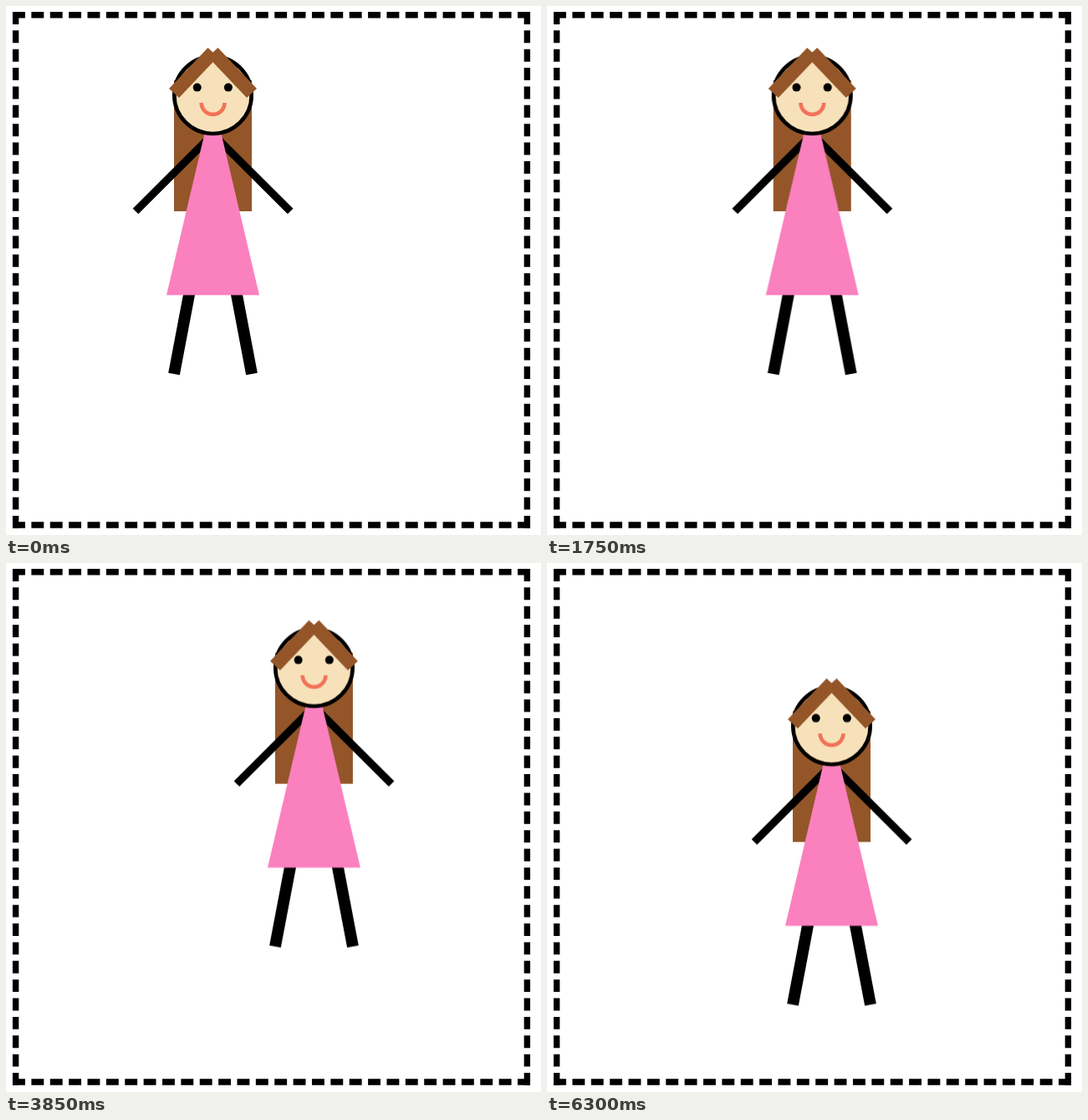
Animation of 640x634 px, one loop 6370 ms. Source, as an HTML page:

```html
<!DOCTYPE html>
<html lang="en">
<head>
<meta charset="utf-8">
<title>Walking stick figure</title>
<style>
  html, body { margin: 0; width: 100%; height: 100%; overflow: hidden; background: #fff; }
  svg { display: block; width: 640px; height: 634px; }

  /* The figure moves in key-press steps of one fixed length. */
  .walk { --s: 4.65px; animation: 6370ms infinite; }
  .across { animation-name: across; }
  .down { animation-name: down; }

  @keyframes across {
    0%    { transform: translateX(0px); }
    6.8%  { transform: translateX(0px); animation-timing-function: steps(4); }
    12%   { transform: translateX(calc(4 * var(--s))); animation-timing-function: steps(10); }
    25.2% { transform: translateX(calc(14 * var(--s))); animation-timing-function: steps(1); }
    27.4% { transform: translateX(calc(15 * var(--s))); animation-timing-function: steps(7); }
    37.3% { transform: translateX(calc(22 * var(--s))); animation-timing-function: steps(3); }
    42.8% { transform: translateX(calc(25 * var(--s))); animation-timing-function: steps(1); }
    45%   { transform: translateX(calc(26 * var(--s))); }
    90.1% { transform: translateX(calc(26 * var(--s))); animation-timing-function: steps(6); }
    98.8%, 100% { transform: translateX(calc(20 * var(--s))); }
  }
  @keyframes down {
    0%    { transform: translateY(0px); }
    54.6% { transform: translateY(0px); animation-timing-function: steps(8); }
    65.9% { transform: translateY(calc(8 * var(--s))); animation-timing-function: steps(3); }
    70.3% { transform: translateY(calc(11 * var(--s))); animation-timing-function: steps(8); }
    82.1%, 100% { transform: translateY(calc(19 * var(--s))); }
  }

  .fence { fill: none; stroke: #000; stroke-width: 7.4; stroke-dasharray: 14.9 7.473; }
  .hair { fill: #945628; }
  .limb { stroke: #000; }
</style>
</head>
<body>
<svg viewBox="0 0 640 634">
  <path class="fence" d="M8 10.7H627M8 622H627M11.6 7V626M623.4 7V626"/>
  <g class="walk across">
    <g class="walk down">
      <rect class="hair" x="201" y="89" width="93" height="157"/>
      <path class="limb" stroke-width="9.3" d="M245 156L155 246M250 156L340.2 246"/>
      <path class="limb" stroke-width="13.9" d="M220.9 336L201 441M274.1 336L294 441"/>
      <path fill="#fb80be" d="M238.2 150H256.8L303 346.5H192Z"/>
      <circle cx="247.5" cy="106.8" r="46.2" fill="#f7e1ba" stroke="#000" stroke-width="4.65"/>
      <path class="hair" d="M195 99L241.5 50L253.5 61L207 110Z"/>
      <path class="hair" d="M300 99L253.5 50L241.5 61L288 110Z"/>
      <circle cx="228.7" cy="97.6" r="5"/>
      <circle cx="265.9" cy="97.6" r="5"/>
      <path fill="none" stroke="#f27258" stroke-width="4.6" d="M233.7 116a13.9 13.9 0 0 0 27.8 0"/>
    </g>
  </g>
</svg>
</body>
</html>
```
